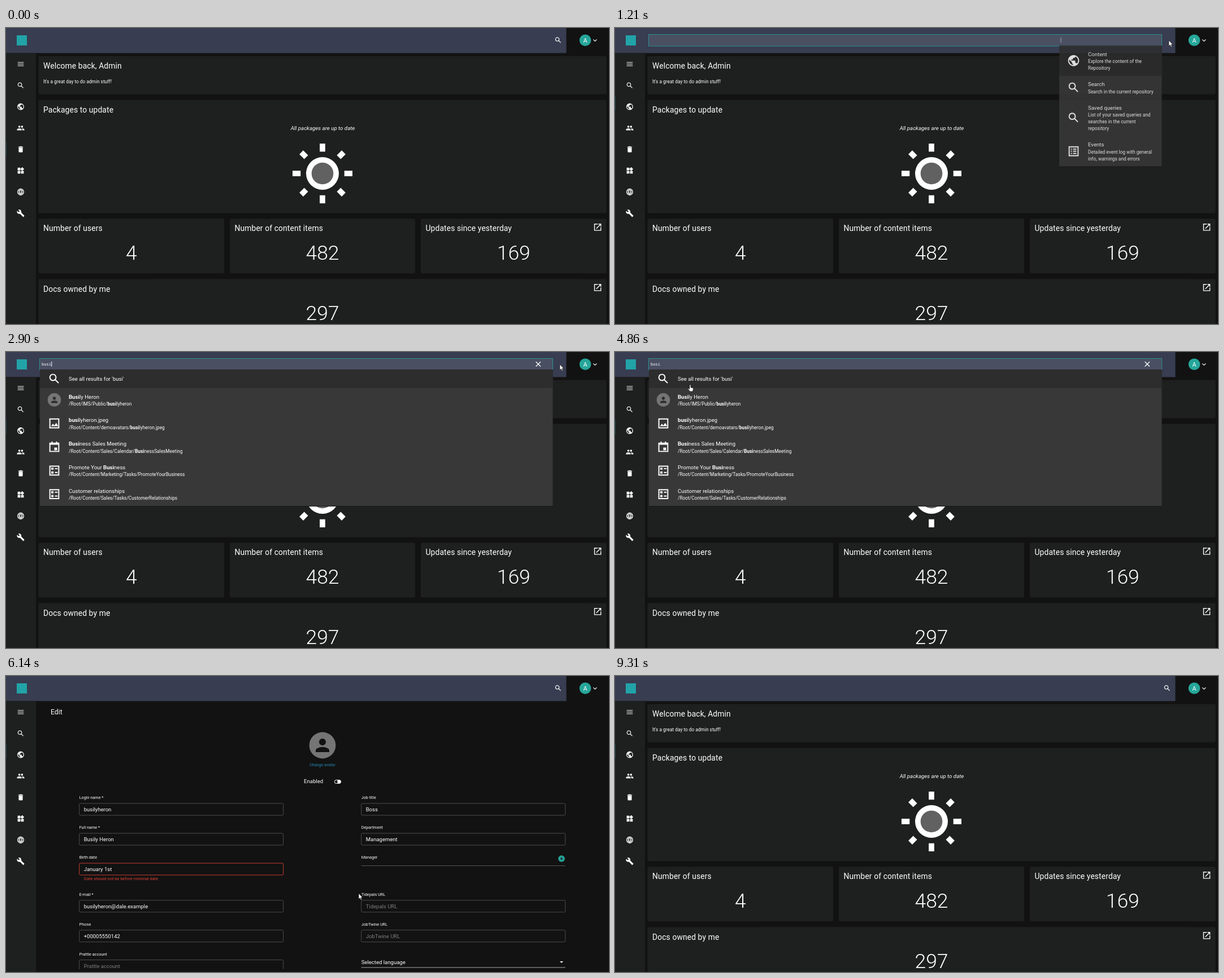
An HTML page that plays this animation: 1067x525 px, repeating every 9.49 s.

```html
<!DOCTYPE html>
<html lang="en">
<head>
<meta charset="utf-8">
<title>Admin dashboard search</title>
<style>
  html, body { margin: 0; width: 100%; height: 100%; overflow: hidden; background: #121212; }
  svg { display: block; font-family: Roboto, sans-serif; fill: #fff; }
  .mono { font-family: "DejaVu Sans Mono", monospace; }
  .line { fill: none; stroke-width: 2; }
</style>
</head>
<body>
<svg id="stage" width="1067" height="525" viewBox="0 0 1067 525"></svg>
<script>
const LOOP = 9490;

// Icons on a 24 unit grid: [stroked path, filled path]
const FRAME = 'M4 4h16v16H4z';
const ICONS = {
  menu: ['M3 7h18M3 12h18M3 17h18', ''],
  search: ['M9.5 4a5.5 5.5 0 1 0 .01 0zM14 14l5.7 5.7', ''],
  globe: ['', 'M12 2C6.48 2 2 6.48 2 12s4.48 10 10 10 10-4.48 10-10S17.52 2 12 2zm-1 17.93c-3.95-.49-7-3.85-7-7.93 0-.62.08-1.21.21-1.79L9 15v1c0 1.1.9 2 2 2v1.93zm6.9-2.54c-.26-.81-1-1.39-1.9-1.39h-1v-3c0-.55-.45-1-1-1H8v-2h2c.55 0 1-.45 1-1V7h2c1.1 0 2-.9 2-2v-.41c2.93 1.19 5 4.06 5 7.41 0 2.08-.8 3.97-2.1 5.39z'],
  people: ['', 'M8 5a3 3 0 1 0 .01 0zM16 5a3 3 0 1 0 .01 0zM8 13c-2.3 0-7 1.2-7 3.5V19h14v-2.5c0-2.3-4.7-3.5-7-3.5zm8 0l-1 .1c1.2.8 2 1.9 2 3.4V19h6v-2.5c0-2.3-4.7-3.5-7-3.5z'],
  trash: ['', 'M6 7h12v12a2 2 0 0 1-2 2H8a2 2 0 0 1-2-2zM5 4h3.5l1-1h5l1 1H19v2H5z'],
  widgets: ['', 'M13 13h8v8h-8zM3 13h8v8H3zM3 3h8v8H3zM16.7 1.7l5.6 5.6-5.6 5.7L11 7.3z'],
  world: ['M12 3a9 9 0 1 0 .01 0zM12 3c-5 5-5 13 0 18c5-5 5-13 0-18M4 9h16M4 15h16', ''],
  wrench: ['', 'M22.7 19l-9.1-9.1c.9-2.3.4-5-1.5-6.9-2-2-5-2.4-7.4-1.3L9 6 6 9 1.6 4.7C.4 7.1.9 10.1 2.9 12.1c1.9 1.9 4.6 2.4 6.9 1.5l9.1 9.1c.4.4 1 .4 1.4 0l2.3-2.3c.5-.4.5-1.1.1-1.4z'],
  open: ['M12 4H4v16h16v-8M8.5 15.5L20 4M14 4h6v6', ''],
  list: [FRAME + 'M7 8h2m2 0h6M7 12h2m2 0h6M7 16h2m2 0h6', ''],
  ballot: [FRAME + 'M13 8.5h5M13 15.5h5M7.5 7.5h2v2h-2zM7.5 14.5h2v2h-2z', ''],
  image: [FRAME, 'M6 17l3.5-4.5 2.5 3 3.5-4.5L19 17z'],
  event: ['M4 5h16v15H4zM4 7h16M8 2v3M16 2v3', 'M12 13h5v5h-5z'],
  person: ['', 'M12 4a4 4 0 1 0 .01 0zM12 14c-2.7 0-8 1.3-8 4v2h16v-2c0-2.7-5.3-4-8-4z'],
  close: ['M5.5 5.5l13 13M18.5 5.5l-13 13', ''],
  down: ['M6.7 9.3l5.3 5.3 5.3-5.3', ''],
  plus: ['M12 7v10M7 12h10', '']
};

const rect = (x, y, w, h, attrs = '') =>
  `<rect x="${x}" y="${y}" width="${w}" height="${h}" ${attrs}/>`;
const circle = (x, y, r, fill) => `<circle cx="${x}" cy="${y}" r="${r}" fill="${fill}"/>`;
const group = (id, body, attrs = '') => `<g id="${id}" ${attrs}>${body}</g>`;
const icon = (name, x, y, size, color = '#fff') =>
  `<g transform="translate(${x - size / 2} ${y - size / 2}) scale(${size / 24})">` +
  `<path class="line" stroke="${color}" d="${ICONS[name][0]}"/><path fill="${color}" d="${ICONS[name][1]}"/></g>`;
// y is the middle of the capitals; [brackets] mark bold text
const text = (x, y, size, str, attrs = '') =>
  `<text x="${x}" y="${y + size * 0.355}" font-size="${size}" ${attrs}>` +
  str.replace(/\[(.*?)\]/g, '<tspan font-weight="700">$1</tspan>') + '</text>';
const MIDDLE = 'text-anchor="middle"';

function card(x, y, w, h, title, count) {
  let out = rect(x, y, w, h, 'rx="2.8" fill="#1e1f1f"') +
    text(x + 8.5, y + 17.3, 13.89, title, 'letter-spacing=".1"');
  if (count) out += text(x + w / 2, y + 60, 35.6, count, MIDDLE + ' font-weight="300"');
  return out;
}

function sun() {
  let out = '';
  for (let i = 0; i < 8; i++)
    out += rect(-4.85, -53, 9.7, i % 2 ? 12.2 : 14.3, `transform="rotate(${i * 45})"`);
  return `<g transform="translate(560 258)">${out}${circle(0, 0, 29, '#fff')}${circle(0, 0, 19.3, '#616161')}</g>`;
}

function dashboard() {
  return card(57.5, 49.7, 1005, 67.8, 'Welcome back, Admin') +
    text(66, 95, 8.34, "It's a great day to do admin stuff!") +
    card(57.5, 127.5, 1005, 201, 'Packages to update') +
    text(560.5, 177.3, 9.73, 'All packages are up to date', MIDDLE + ' font-style="italic"') + sun() +
    card(57.5, 338.2, 328.5, 97, 'Number of users', '4') +
    card(396, 338.2, 328, 97, 'Number of content items', '482') +
    card(734, 338.2, 328.5, 97, 'Updates since yesterday', '169') +
    card(57.5, 445.3, 1005, 90, 'Docs owned by me', '297') +
    icon('open', 1047, 353.3, 16.7) + icon('open', 1047, 460.3, 16.7);
}

function field(x, y, label, value, { hint = false, error = false } = {}) {
  return text(x, y, 7.25, label) +
    rect(x, y + 10.5, 361, 21, `rx="2" fill="none" stroke="${error ? '#c83a2e' : '#4c4c4c'}"`) +
    text(x + 8, y + 21.5, 9.5, value, hint ? 'fill="#7d7d7d"' : '');
}

function form() {
  const L = 129.7, R = 628.7;
  return text(79, 64, 12.2, 'Edit') +
    circle(560, 123, 23.4, '#757575') + icon('person', 560, 123, 36, '#121212') +
    text(560, 157, 7.15, 'Change avatar', MIDDLE + ' fill="#2488b0"') +
    text(527, 187, 9.6, 'Enabled') +
    rect(581.3, 184.5, 11, 6, 'rx="3" fill="none" stroke="#fff"') + circle(589.5, 187.5, 3.2, '#fff') +
    field(L, 215.5, 'Login name *', 'busilyheron') +
    field(L, 268.5, 'Full name *', 'Busily Heron') +
    field(L, 321.5, 'Birth date', 'January 1st', { error: true }) +
    text(138, 359.5, 7.5, 'Date should not be before minimal date', 'fill="#dc4033"') +
    field(L, 387.3, 'E-mail *', 'busilyheron@dale.example') +
    field(L, 440.2, 'Phone', '+00005550142') +
    field(L, 493, 'Prattle account', 'Prattle account', { hint: true }) +
    field(R, 215.5, 'Job title', 'Boss') +
    field(R, 268.5, 'Department', 'Management') +
    text(R, 321.5, 7.25, 'Manager') + rect(R, 336, 361, 1, 'fill="#555"') +
    circle(983, 324, 5.8, '#26a69a') + icon('plus', 983, 324, 13, '#121212') +
    field(R, 387.3, 'Tidepals URL', 'Tidepals URL', { hint: true }) +
    field(R, 440.2, 'JobTwine URL', 'JobTwine URL', { hint: true }) +
    text(R, 507.5, 9.55, 'Selected language') + rect(R, 516.5, 361, 1, 'fill="#aaa"') +
    '<path d="M980 506h6l-3 3z"/>';
}

// Dropdown: rows are [icon, title, ...description lines]
const rowTops = {};
function dropdown(id, x, rows) {
  let y = 31, body = '';
  const tops = rowTops[id] = [y];
  for (const [name, title, ...lines] of rows) {
    const h = lines.length ? 30 + 11.8 * lines.length : 33;
    const mid = y + h / 2;
    if (name === 'person')
      body += circle(x + 25.5, mid, 11.8, '#757575') + icon(name, x + 25.5, mid, 17, '#2d2d2d');
    else body += icon(name, x + 25.5, mid, 23.6);
    body += text(x + 51, lines.length ? y + 15.2 : mid, 9.6, title);
    lines.forEach((line, i) => body += text(x + 51, y + 28 + 11.8 * i, 8.34, line));
    tops.push(y += h);
  }
  return group(id, rect(x, 31, 967.5 - x, y - 30, 'fill="#161616"') +
    rect(x, 31, 967.5 - x, y - 31, 'fill="#383838"') +
    rect(x, 31, 967.5 - x, tops[1] - 31, `id="${id}Mark" fill="#2d2d2d"`) + body);
}

const sideIcons = ['menu', 'search', 'globe', 'people', 'trash', 'widgets', 'world', 'wrench'];

stage.innerHTML =
  '<clipPath id="formClip"><path d="M0 0h1067v520H0z"/></clipPath>' +
  rect(0, 0, 1067, 525, 'fill="#121212"') +
  rect(0, 0, 991.5, 44.5, 'fill="#383d51"') +
  rect(19, 13, 18, 18, 'fill="#22a3a8"') +
  rect(0, 44.5, 53, 480.5, 'fill="#1e1f1f"') +
  rect(0, 0, 1, 26, 'id="sideMark" fill="#1d444b"') +
  sideIcons.map((name, i) => icon(name, 26, 64 + i * 37.8, 14.3)).join('') +
  circle(1025, 21.8, 10.3, '#26a69a') + text(1025, 21.8, 10.8, 'A', MIDDLE) +
  icon('down', 1042.3, 22, 14) +
  group('home', dashboard()) +
  group('edit', form(), 'clip-path="url(#formClip)"') +
  group('glass', icon('search', 977, 21.5, 14)) +
  rect(0, 11.5, 0, 20.5, 'id="box" fill="#4a4f62" stroke="#2c8f90"') +
  text(63, 21.8, 7.1, '', 'id="query" class="mono"') +
  rect(0, 17, 1, 9, 'id="caret"') +
  group('clear', icon('close', 941.8, 21.5, 15.5)) +
  dropdown('narrow', 786, [
    ['globe', 'Content', 'Explore the content of the', 'Repository'],
    ['search', 'Search', 'Search in the current repository'],
    ['search', 'Saved queries', 'List of your saved queries and', 'searches in the current', 'repository'],
    ['list', 'Events', 'Detailed event log with general', 'info, warnings and errors']]) +
  dropdown('wide', 60, [
    ['globe', 'Content', 'Explore the content of the Repository'],
    ['search', 'Search', 'Search in the current repository'],
    ['search', 'Saved queries', 'List of your saved queries and searches in the current repository'],
    ['list', 'Events', 'Detailed event log with general info, warnings and errors']]) +
  dropdown('results', 60, [
    ['search', "See all results for 'busi'"],
    ['person', '[Busi]ly Heron', '/Root/IMS/Public/[busi]lyheron'],
    ['image', '[busi]lyheron.jpeg', '/Root/Content/demoavatars/[busi]lyheron.jpeg'],
    ['event', '[Busi]ness Sales Meeting', '/Root/Content/Sales/Calendar/[Busi]nessSalesMeeting'],
    ['ballot', 'Promote Your [Busi]ness', '/Root/Content/Marketing/Tasks/PromoteYourBusiness'],
    ['ballot', 'Customer relationships', '/Root/Content/Sales/Tasks/CustomerRelationships']]) +
  group('pointer',
    '<path id="arrow" d="M0 0v10l2.3-2.1 1.6 3.6 1.6-.7-1.6-3.5h3z"/>' +
    '<path id="hand" d="M-1 1a1 1 0 0 1 2 0v4l3.6.8a1.2 1.2 0 0 1 1 1.4l-.8 3.3-.8 1.5h-4l-3.5-4a.9.9 0 0 1 1.3-1.1l1.2 1z"/>',
    'stroke="#111" stroke-width=".6"');

const el = {};
document.querySelectorAll('[id]').forEach(node => el[node.id] = node);
const show = (id, on) => el[id].style.display = on ? '' : 'none';
const set = (id, attrs) => { for (const k in attrs) el[id].setAttribute(k, attrs[k]); };
const progress = (t, a, b) => Math.min(1, Math.max(0, (t - a) / (b - a)));
const ease = p => p * p * (3 - 2 * p);

// Pointer legs: start, end, bend x/y, target x/y
const START = [1026, 524];
const LEGS = [
  [20, 700, 1015, 200, 980, 22],
  [3650, 3740, 975, 200, 964, 372],
  [3900, 4830, 700, 520, 133, 58],
  [4860, 5180, 134, 70, 134, 84],
  [5840, 6390, 635, 443, 885, 470],
  [6890, 7820, -120, 120, 29, 33],
  [7850, 7970, 28, 26, 28, 18],
  [8180, 9100, 420, 330, 1043, 517],
  [9130, 9310, 1043, 520, 1043, 527]
];

function pointerAt(t) {
  let [x, y] = START;
  for (const [a, b, bx, by, ex, ey] of LEGS) {
    if (t < a) break;
    const s = ease(progress(t, a, b)), q = 1 - s;
    x = q * q * x + 2 * q * s * bx + s * s * ex;
    y = q * q * y + 2 * q * s * by + s * s * ey;
  }
  return [x, y];
}

const KEYS = [2470, 2600, 2730, 2870];
const RESULTS = 2900, PICK = 5300, BLANK = 5560, FORM = 5840, HOME = 8290;

function draw(t) {
  const [x, y] = pointerAt(t);
  const open = t >= 860 && t < 5600;

  show('home', t < BLANK || t >= HOME);
  show('edit', t >= FORM && t < HOME);
  set('sideMark', { y: t < 860 ? 202 : 120 });

  const width = 908 * ease(progress(t, 860, 1090)) * (1 - ease(progress(t, 5350, 5600)));
  show('glass', !open);
  show('box', open);
  set('box', { x: 967.5 - width, width });

  const typed = KEYS.filter(k => t >= k).length;
  el.query.textContent = t < PICK ? 'busi'.slice(0, typed) : '';
  show('clear', typed && t < PICK);

  const blinkFrom = typed ? KEYS[typed - 1] : 1030;
  show('caret', t >= 1030 && t < PICK && Math.floor((t - blinkFrom) / 530) % 2 === 0);
  set('caret', { x: t < 1240 ? 788.5 : 63 + typed * 4.3, opacity: t < 1240 ? 0.5 : 1 });

  const fadeIn = progress(t, 1040, 1240);
  show('narrow', t >= 1040 && t < 1240);
  show('wide', t >= 1240 && t < RESULTS);
  show('results', t >= RESULTS && t < 5500);
  set('narrow', { opacity: fadeIn });
  set('wide', { opacity: 0.6 + 0.4 * progress(t, 1240, 1400) });
  set('results', { opacity: 1 - progress(t, PICK, 5500) });

  const tops = rowTops.results;
  const overList = t >= 3900 && t < PICK && x > 60 && x < 967 && y > 31 && y < tops[6];
  const row = overList ? tops.findIndex(top => top > y) - 1 : 0;
  set('resultsMark', { y: tops[row], height: tops[row + 1] - tops[row] });

  const hand = overList || x < 53 || (t > 500 && t < 870 && y < 44);
  show('pointer', t >= 20 && t < 9310);
  show('hand', hand);
  show('arrow', !hand);
  set('pointer', { transform: `translate(${x} ${y})` });
}

const began = performance.now();
function tick() {
  draw((performance.now() - began) % LOOP);
  requestAnimationFrame(tick);
}
tick();
</script>
</body>
</html>
```
